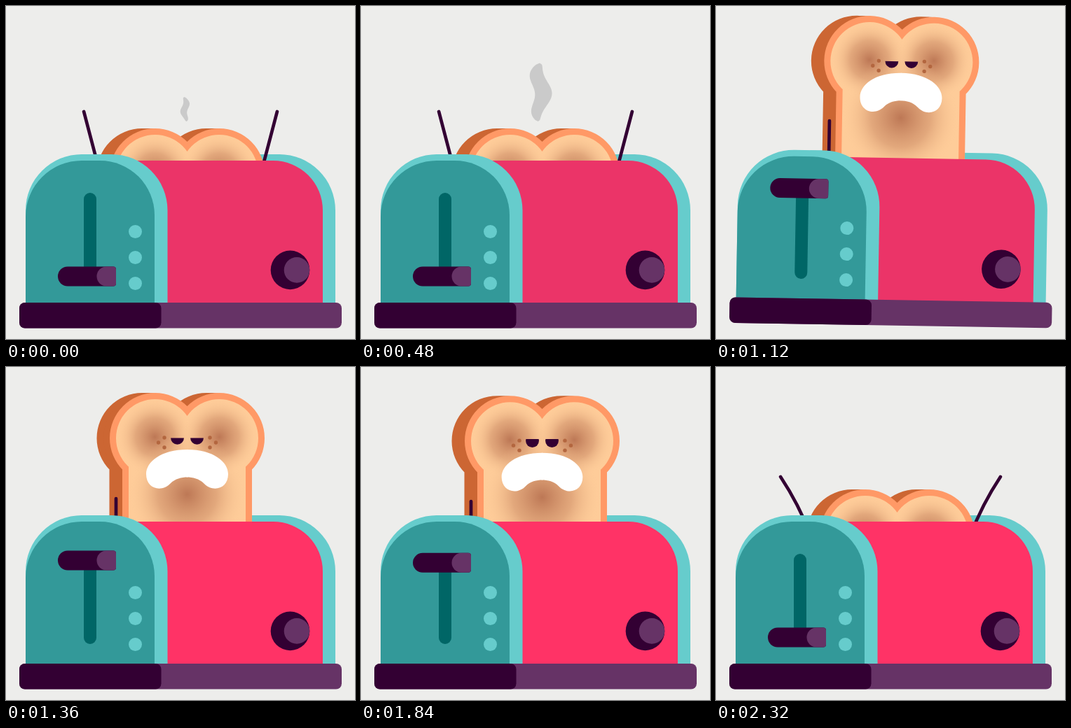
Animation of 498x476 px, one loop 2400 ms. Source, as an HTML page with a canvas:

```html
<!DOCTYPE html>
<html lang="en">
<head>
<meta charset="utf-8">
<title>Toaster</title>
<style>
  html, body { margin: 0; width: 100%; height: 100%; overflow: hidden; background: #ededeb; }
  canvas { display: block; }
</style>
</head>
<body>
<canvas id="stage" width="498" height="476"></canvas>
<script>
const ctx = document.getElementById('stage').getContext('2d');
const LOOP = 2400, STEP = 80;
const POP = 960, WAKE = 1760, DROP = 2000, LAND = 2160, FLOP = 2240;
const PAPER = '#ededeb', DARK = '#330033', PLUM = '#663366', TEAL = '#339999', AQUA = '#66cccc';
const CRUST = '#ff9966', RIND = '#cc6633', CRUMB = '#fecc99';
const MID = 258.5;

const ramp = (t, from, to) => Math.min(1, Math.max(0, (t - from) / (to - from)));
const smooth = u => u * u * (3 - 2 * u);
const bump = u => Math.sin(Math.PI * u);
// Damped spring from 0 to 1, first overshoot after 160 ms
const spring = s => s <= 0 ? 0 : 1 - Math.exp(-s / 79.6) * Math.cos(Math.PI * s / 160);

// Everything that moves, as a function of the time in the loop
function pose(t) {
  const wake = smooth(ramp(t, WAKE, DROP));
  const fall = Math.pow(ramp(t, DROP, LAND), 1.5);
  const height = spring(t - POP) - 0.116 * wake - 0.884 * fall;
  const hang = ramp(t, POP, POP + STEP) - ramp(t, DROP, LAND);
  const flop = bump(ramp(t, FLOP, LOOP));
  const raised = 14.7 + 6.3 * flop;
  return {
    wake,
    toast: 175 - 138 * height,
    lever: 386.5 - 110 * Math.min(height, 1.09),
    tilt: 0.96 * bump(ramp(t, POP, POP + 320)),
    arm: raised + (180 - raised) * hang,
    bend: 20 * flop,
    red: t < 1200 ? '#eb3468' : '#ff3366'
  };
}

function box(x, y, w, h, r, color) {
  ctx.fillStyle = color;
  ctx.beginPath();
  ctx.roundRect(x, y, w, h, r);
  ctx.fill();
}

function disc(x, y, r, color) {
  ctx.fillStyle = color;
  ctx.beginPath();
  ctx.arc(x, y, r, 0, Math.PI * 2);
  ctx.fill();
}

// Slice silhouette: two lobes over a straight body
function slice(x, y, inset) {
  const r = 64.7 - inset, half = 92.5 - inset;
  ctx.beginPath();
  for (const side of [-1, 1]) {
    const cx = x + side * 45.8;
    ctx.moveTo(cx + r, y + 64.7);
    ctx.arc(cx, y + 64.7, r, 0, Math.PI * 2);
  }
  ctx.rect(x - half, y + 64.7, half * 2, 185);
}

function fillSlice(x, y, inset, color) {
  ctx.fillStyle = color;
  slice(x, y, inset);
  ctx.fill();
}

function scorch(x, y, r) {
  const g = ctx.createRadialGradient(x, y, 0, x, y, r);
  g.addColorStop(0, 'rgba(180,108,76,.88)');
  g.addColorStop(0.5, 'rgba(196,128,92,.48)');
  g.addColorStop(1, 'rgba(254,204,153,0)');
  disc(x, y, r, g);
}

function arm(x, y, side, deg, bend) {
  const a = deg * Math.PI / 180, len = 181;
  const dx = side * Math.sin(a), dy = -Math.cos(a);
  ctx.strokeStyle = DARK;
  ctx.lineWidth = 4.7;
  ctx.lineCap = 'round';
  ctx.beginPath();
  ctx.moveTo(x, y);
  ctx.quadraticCurveTo(x + dx * len / 2 + side * dy * bend, y + dy * len / 2 - side * dx * bend,
    x + dx * len, y + dy * len);
  ctx.stroke();
}

function moustache(y, squash) {
  ctx.save();
  ctx.translate(MID, y + 81 + 2 * squash);
  ctx.scale(1 - 0.04 * squash, 1 - 0.06 * squash);
  ctx.fillStyle = '#fff';
  for (const side of [-1, 1]) {
    ctx.beginPath();
    ctx.moveTo(-side * 0.5, 0);
    ctx.bezierCurveTo(side * 38, 0, side * 58.5, 18, side * 58.5, 35);
    ctx.bezierCurveTo(side * 58.5, 56, side * 37, 62, side * 24, 48.5);
    ctx.bezierCurveTo(side * 17, 41.5, side * 8, 39.5, -side * 0.5, 39.5);
    ctx.fill();
  }
  ctx.restore();
}

function face(y, wake) {
  for (const side of [-1, 1]) {
    const x = MID + side * 14, eye = y + 64.4;
    ctx.save();
    ctx.beginPath();
    ctx.rect(x - 12, eye - 10 * wake, 24, 24);
    ctx.clip();
    disc(x, eye, 9.4, DARK);
    ctx.restore();
    for (const row of [-1, 0, 1]) {
      disc(MID + side * (row ? 32.5 : 41), y + 71 + row * 7, 2.7, '#b3663f');
    }
  }
  moustache(y, wake);
}

function toast(p) {
  const y = p.toast, shoulder = y + 151;
  arm(341, shoulder, 1, p.arm, p.bend);
  for (const dx of [-18.5, -9]) fillSlice(MID + dx, y, 0, RIND);
  arm(157, shoulder, -1, p.arm, p.bend);
  fillSlice(MID, y, 0, CRUST);
  fillSlice(MID, y, 9, CRUMB);
  ctx.save();
  slice(MID, y, 9);
  ctx.clip();
  for (const side of [-1, 1]) scorch(MID + side * 46, y + 63, 55);
  scorch(MID, y + 145, 84);
  ctx.restore();
  face(y, p.wake);
}

function shell(p) {
  box(110, 221, 342, 205, [0, 71, 0, 0], p.red);
  disc(405.5, 377.4, 27.8, DARK);
  disc(415, 377.4, 18.3, PLUM);

  box(28, 212, 202.5, 214, [80, 80, 0, 0], AQUA);
  box(28, 221, 184, 205, [80, 78, 0, 0], TEAL);
  box(111, 267, 18, 129, 9, '#006666');
  for (let i = 0; i < 3; i++) disc(184.5, 322.5 + 37 * i, 9.5, AQUA);

  const y = p.lever - 14, ends = [14, 4, 4, 14];
  box(74, y, 83, 28, ends, DARK);
  box(129.5, y, 27.5, 28, ends, PLUM);

  box(19, 424, 460, 36.5, 8, PLUM);
  box(19, 424, 202.5, 36.5, 8, DARK);
}

// A wavy wisp that grows, then lifts off and thins out
function steam(t) {
  const fade = 1 - ramp(t, 800, 1000);
  if (!fade) return;
  const grow = 1 - Math.pow(1 - ramp(t, 0, 800), 1.4);
  const top = 130 - 67 * grow;
  const end = 165 - 45 * Math.pow(ramp(t, 760, 960), 1.4);
  const half = (5 + 10 * grow) * fade, sway = 2 + 4 * grow, peak = 0.25 - 0.61 * grow;
  const N = 40;
  const edge = (u, side) => {
    const mid = 255.5 + sway * Math.cos(2 * Math.PI * (u - peak) / 0.72);
    const w = half * Math.sqrt(Math.max(0, bump(Math.pow(u, 0.9))));
    ctx.lineTo(mid + side * w, top + (end - top) * u);
  };
  ctx.fillStyle = '#cacaca';
  ctx.beginPath();
  for (let i = 0; i <= N; i++) edge(i / N, 1);
  for (let i = N; i >= 0; i--) edge(i / N, -1);
  ctx.fill();
}

function draw(t) {
  const p = pose(t);
  ctx.fillStyle = PAPER;
  ctx.fillRect(0, 0, 498, 476);
  steam(t);
  ctx.save();
  // The toaster tips around its lower right corner
  ctx.translate(479, 460);
  ctx.rotate(p.tilt * Math.PI / 180);
  ctx.translate(-479, -460);
  box(130, 212, 340, 214, [0, 80, 0, 0], AQUA);
  // Keep the toast inside the slot
  ctx.save();
  ctx.beginPath();
  ctx.rect(-100, -100, 700, 340);
  ctx.clip();
  toast(p);
  ctx.restore();
  shell(p);
  ctx.restore();
}

function tick() {
  const t = performance.now() % LOOP;
  draw(Math.floor(t / STEP) * STEP);
  requestAnimationFrame(tick);
}
tick();
</script>
</body>
</html>
```
